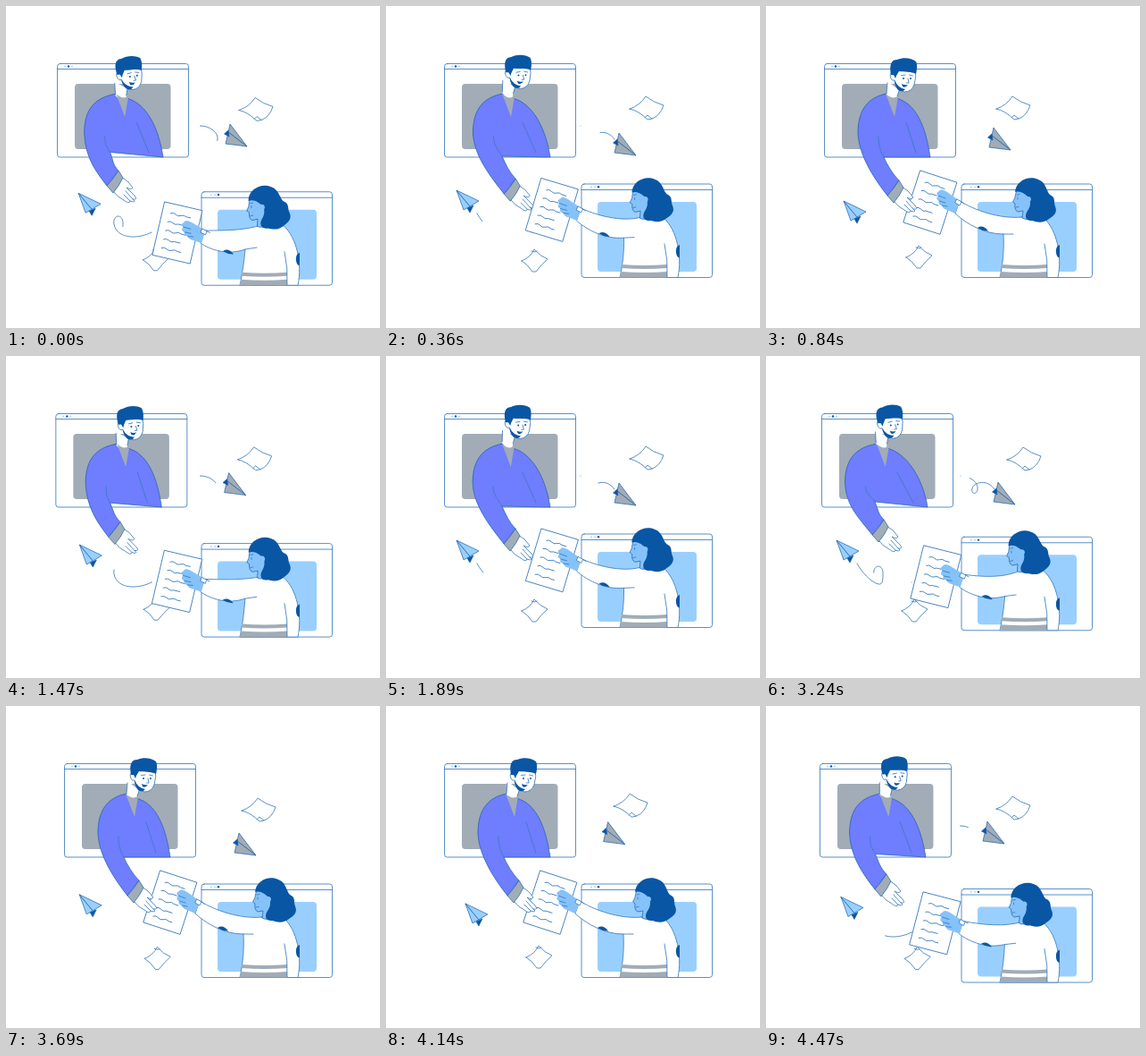
Animation of 419 by 360 pixels, one loop 4.5 s. Source, as an HTML page:

```html
<!DOCTYPE html>
<html lang="en">
<head>
<meta charset="utf-8">
<title>Handing over a document</title>
<style>
  html, body { margin: 0; width: 100%; height: 100%; overflow: hidden; background: #fff; }
  svg { display: block; width: 100%; height: 100%; }
  .line, .paper { stroke: #3c7cbd; stroke-width: .85; stroke-linecap: round; stroke-linejoin: round; }
  .line { fill: none; }
  .paper { fill: #fff; }
  .dark { fill: #0956a5; }
  .grey { fill: #a1acb7; }
  .sky { fill: #99cfff; }
  .skin { fill: #86c2fa; }
  .coat { fill: #6f7dff; }
  .thin { stroke: #1b5fa8; stroke-width: .7; stroke-linejoin: round; }
</style>
</head>
<body>
<svg viewBox="0 0 419 360">
  <path id="trailR" class="line" pathLength="1" d="M218 134C228 134 238 141 237 149C236 156 229 154 231 148C233 141 248 137 256 149"/>
  <path id="trailL" class="line" pathLength="1" d="M163 253C150 260 125 262 121 244C119 234 130 231 131 242C131 250 131 256 126 255C117 253 107 241 102 232"/>

  <g id="sheetTop">
    <path class="paper" d="M258 115Q270 111 276 101Q285 108 296 111Q292 123 283 126L278 127Q268 117 258 115Z"/>
    <path class="line" d="M275 125L278 122L283 126"/>
  </g>
  <g id="sheetLow">
    <path class="paper" d="M157 281Q167 277 171 268Q178 276 186 279Q179 285 173 293L169 293Q164 285 157 281Z"/>
    <path class="line" d="M168 270L172 271L174 270"/>
  </g>

  <g id="planeR" class="thin">
    <path class="grey" d="M261 142L280 167L259 151Z"/>
    <path class="grey" d="M259 151L280 167L256 164Z"/>
    <path class="dark" d="M259 149L254.500 153L260 156Z"/>
  </g>
  <g id="planeL" class="thin">
    <path class="sky" d="M79 206L87 228L94 224Z"/>
    <path class="sky" d="M79 206L104 218L94 224Z"/>
    <path class="dark" d="M91 226L98 223L94 231Z"/>
  </g>

  <g id="winL">
    <rect class="paper" x="65.500" y="64.500" width="147" height="104.500" rx="3"/>
    <path class="line" d="M65.500 70.500H212.500"/>
    <circle class="sky" cx="74" cy="67.500" r=".9"/>
    <circle class="dark" cx="78" cy="67.500" r="1.200"/>
    <circle class="sky" cx="82" cy="67.500" r=".9"/>
    <rect class="grey" x="85" y="87" width="107.500" height="73" rx="4"/>
  </g>

  <g id="winR">
    <rect class="paper" x="219" y="199" width="146.500" height="104.500" rx="3"/>
    <path class="line" d="M219 205.500H365.500"/>
    <circle class="sky" cx="230" cy="202.300" r=".9"/>
    <circle class="sky" cx="234" cy="202.300" r=".9"/>
    <circle class="dark" cx="238" cy="202.300" r="1.200"/>
    <rect class="sky" x="237" y="219" width="111" height="78" rx="4"/>
  </g>

  <path id="coat" class="coat thin"/>
  <path id="folds" class="line"/>
  <g id="manHead">
    <path d="M136 84L135 100L144 112L149 94Z" fill="#fff"/>
    <path class="line" d="M136 86L135 98M149 95L147 101"/>
    <path class="paper" d="M142 70L141 74Q138 76 140 81Q141 84 144 83Q146 94 155 96Q163 96 166 88Q169 79 167 70Z"/>
    <path class="dark" d="M140 77C138 66 140 60 147 60C154 57 163 58 168 62C170 66 169 72 168 76C163 73 155 74 149 73L146 78L145 81L143 77Z"/>
    <path class="dark" d="M144 83Q148 92 156 93Q153 97 148 94Q144 89 144 83Z"/>
    <circle class="dark" cx="154" cy="81" r="1"/>
    <circle class="dark" cx="162" cy="81" r="1"/>
    <path class="line" d="M151.500 77.500L156 77M160.500 77L164.500 78M159 81L160 86L157.500 86"/>
    <path class="dark" d="M152 87Q156 89 159 88Q156 92 153 90Z"/>
  </g>
  <path id="collar" class="grey"/>

  <g id="page">
    <path class="paper" d="M0 0H43V61H0Z"/>
    <path class="line" stroke-width="1.100" d="M9 11q3 -2 6 0t6 0t6 0l5 0M8 21q3 -2 6 0t6 0l6 0M8 31q3 -2 6 0t6 0t6 0l5 0M8 41q3 -2 6 0t6 0l7 0M8 51q3 -2 6 0t6 0t6 0l4 0"/>
  </g>

  <g id="manHand">
    <path class="paper" d="M152 202Q160 206 165 214Q163 217 158 214L167 223Q171 228 165 227L167 229Q166 231 162 229Q161 233 155 228Q148 225 143 218Z"/>
    <path class="line" d="M157 218L165 227M155 222L162 229"/>
    <path class="grey thin" d="M149 195L154 203Q150 212 143 220L136 212Q143 205 149 195Z"/>
  </g>

  <path id="sweater" class="paper"/>
  <g id="hem">
    <path class="grey" d="M264 289Q290 291 315 289V293Q290 295 263.500 293Z"/>
    <path class="grey" d="M263 297Q290 299 315 297V303.500H262Z"/>
    <path class="line" d="M312 266Q316 284 315 303"/>
    <path class="dark" d="M329 267Q324 269 325 276Q326 282 329 281Z"/>
  </g>
  <path id="elbow" class="dark"/>
  <g id="womanHead">
    <path class="skin thin" d="M281 206Q279 211 279 214L276.500 219L279 221Q278 228 282 230L288 229L287 237Q292 240 297 236L300 222L292 206Z"/>
    <path class="dark" d="M279 208C280 195 295 189 305 194C314 197 314 207 318 211C325 214 322 219 324 224C327 231 322 235 317 238C311 243 304 242 299 240C291 241 289 235 293 229C296 225 297 220 295 215C291 211 286 206 279 208Z"/>
    <path class="skin" d="M291 214Q296 211 297 216Q296 221 292 219Z"/>
    <path class="line" stroke="#0956a5" d="M281 211L284 210.500M282 214V216M280 225L283 224.500"/>
  </g>
  <g id="womanHand">
    <path class="skin" d="M217 218L203 208Q196 203 194 207Q189 209 193 212Q189 216 194 218Q192 222 197 223Q198 227 203 228L212 232Z"/>
    <path class="line" d="M193 212L201 215M194 218L201 220M197 223L203 224"/>
    <path class="paper" d="M214 216L219 219L217 223L212 220Z"/>
    <path class="line" d="M219 219L222 221"/>
  </g>
</svg>
<script>
const LOOP = 4500, CYCLE = 1540;
const times = [0, 160, 350, 610, 840, 1100, 1250, 1390, 1490];
const tracks = {
  win:    [-8, -3, 0, 0, 0, 0, -.5, -5, -10],
  body:   [-18, -17, -7, 0, 0, 0, -2, -11, -17],
  lift:   [-1, -2.5, -3, 0, 0, 0, 0, -1, -1],
  handX:  [-23, -17, -4, 0, 0, 0, -2, -14, -22],
  handY:  [-11, -12, -2, 0, 0, 0, -1, -7, -10],
  grip:   [1, .8, .26, 0, 0, 0, .12, .68, .98],
  nod:    [-8, -8, -4, 0, 0, 0, -1, -5, -8],
  planeR: [-10, -1, 0, 0, -6, -13, -14, -13, -11],
  planeL: [.22, 0, 0, .32, .8, 1, .82, .5, .3],
  sheetX: [3, 12, 15, 6, 0, -3, -2, 0, 2],
  sheetY: [1.5, 1, 0, 2, 0, -3, -2, 0, 1],
  low:    [.7, 1, 1, .35, 0, 0, .1, .35, .6]
};

const $ = id => document.getElementById(id);
const n = times.length;
const timeAt = i => times[(i + n) % n] + CYCLE * Math.floor(i / n);

// Cyclic cubic interpolation without overshoot
function sample(v, p) {
  let i = n - 1;
  while (times[i] > p) i--;
  const val = j => v[(j + n) % n];
  const slope = j => (val(j + 1) - val(j)) / (timeAt(j + 1) - timeAt(j));
  const tangent = j => {
    const a = slope(j - 1), b = slope(j);
    return a * b > 0 ? 2 * a * b / (a + b) : 0;
  };
  const h = timeAt(i + 1) - timeAt(i), u = (p - timeAt(i)) / h, w = 1 - u;
  return val(i) * (1 + 2 * u) * w * w + val(i + 1) * u * u * (3 - 2 * u)
       + h * u * w * (tangent(i) * w - tangent(i + 1) * u);
}

function ramp(keys, x) {
  if (x <= keys[0][0]) return keys[0][1];
  for (let i = 1; i < keys.length; i++) {
    const [x0, y0] = keys[i - 1], [x1, y1] = keys[i];
    if (x < x1) return y0 + (y1 - y0) * (x - x0) / (x1 - x0);
  }
  return keys[keys.length - 1][1];
}

const move = (id, x, y, more = '') =>
  $(id).setAttribute('transform', `translate(${x} ${y}) ${more}`);
const shape = (id, d) => $(id).setAttribute('d', d);
const at = (x, y, [dx, dy]) => `${x + dx} ${y + dy} `;

function trail(id, from, to) {
  const el = $(id), len = Math.max(0, to - from);
  el.style.visibility = len > .005 ? 'visible' : 'hidden';
  el.setAttribute('stroke-dasharray', `0 ${from} ${len} 2`);
}

function drawMan(s) {
  const W = [s.win, 0], N = [s.body * .6, 0], A = [s.body * .85, 0], H = [s.handX, s.handY];
  const M = [(s.win + s.handX) / 2, s.handY / 2];
  move('winL', s.win, 0);
  shape('coat', 'M' + at(135, 98, N) + 'C' + at(115, 102, A) + at(103, 115, A) + at(103, 142, A)
    + 'C' + at(104, 168, A) + at(122, 194, H) + at(136, 212, H)
    + 'L' + at(149, 195, H) + 'C' + at(142, 188, H) + at(136, 178, M) + at(132, 169, M)
    + 'L' + at(184, 169, W) + 'C' + at(180, 143, W) + at(172, 112, N) + at(149, 104, N) + 'Z');
  shape('folds', 'M' + at(126, 146, A) + 'C' + at(126, 156, A) + at(128, 162, M) + at(132, 169, M)
    + 'M' + at(157, 130, N) + 'L' + at(168, 164, W));
  shape('collar', 'M' + at(134, 98, N) + 'Q' + at(141, 105, N) + at(148, 101, N) + 'L' + at(144, 124, N) + 'Z');
  move('manHead', s.body * .7, s.lift, `rotate(${s.body * .45} 145 98)`);
  move('manHand', s.handX, s.handY);
}

function drawWoman(s) {
  const k = s.grip, y = -1.1 * s.win;
  const D = [0, y], G = [6 * k, 33 * k];
  move('winR', 0, y);
  move('hem', 0, y);
  move('page', 173 + 5 * k, 184 + 35 * k, `rotate(${18 - 5 * k})`);
  move('womanHand', 6 * k, 34 * k, `rotate(${-5 * k} 204 217)`);
  shape('sweater', 'M' + at(286, 236, D) + 'C' + at(268, 238, [0, 13 * k]) + at(240, 232, [6 * k, 19 * k])
    + at(217, 218, G) + 'L' + at(212, 232, G)
    + 'C' + at(225, 244, [4 * k, 29 * k]) + at(245, 255, [4 * k, 24 * k]) + at(266, 255, [2 * k, 17 * k])
    + 'C' + at(267, 274, D) + at(265, 290, D) + at(262, 303.5, D)
    + 'L' + at(327, 303.5, D) + 'C' + at(332, 280, D) + at(326, 250, D) + at(311, 237, D)
    + 'Q' + at(299, 242, D) + at(286, 236, D) + 'Z'
    + 'M' + at(266, 255, [2 * k, 17 * k]) + 'L' + at(277, 255, [4 * k, 15 * k]));
  const E = [6 * k, 26 * k];
  shape('elbow', 'M' + at(237, 248, E) + 'Q' + at(243, 244, E) + at(249, 251.5, E)
    + 'Q' + at(243, 252, E) + at(237, 248, E) + 'Z');
  move('womanHead', s.nod * .7, y, `rotate(${s.nod * .5} 294 236)`);
}

function drawFloating(s, p) {
  move('planeR', s.planeR, s.planeR);
  move('planeL', 10 * s.planeL, 15 * s.planeL);
  move('sheetTop', s.sheetX, s.sheetY);
  move('sheetLow', -5 * s.low, 4 * s.low);
  const q = p > 700 ? p - CYCLE : p;
  trail('trailR', ramp([[0, 0], [160, .15], [350, .7], [450, 1]], q),
    ramp([[-190, 0], [-150, .12], [0, .4], [160, 1]], q));
  trail('trailL', ramp([[0, 0], [160, .42], [350, .9], [450, 1]], q),
    ramp([[-190, 0], [-150, .25], [0, .62], [160, 1]], q));
}

function draw(now) {
  const p = now % LOOP % CYCLE, s = {};
  for (const key in tracks) s[key] = sample(tracks[key], p);
  drawMan(s);
  drawWoman(s);
  drawFloating(s, p);
}

function tick() {
  draw(performance.now());
  requestAnimationFrame(tick);
}
tick();
</script>
</body>
</html>
```
